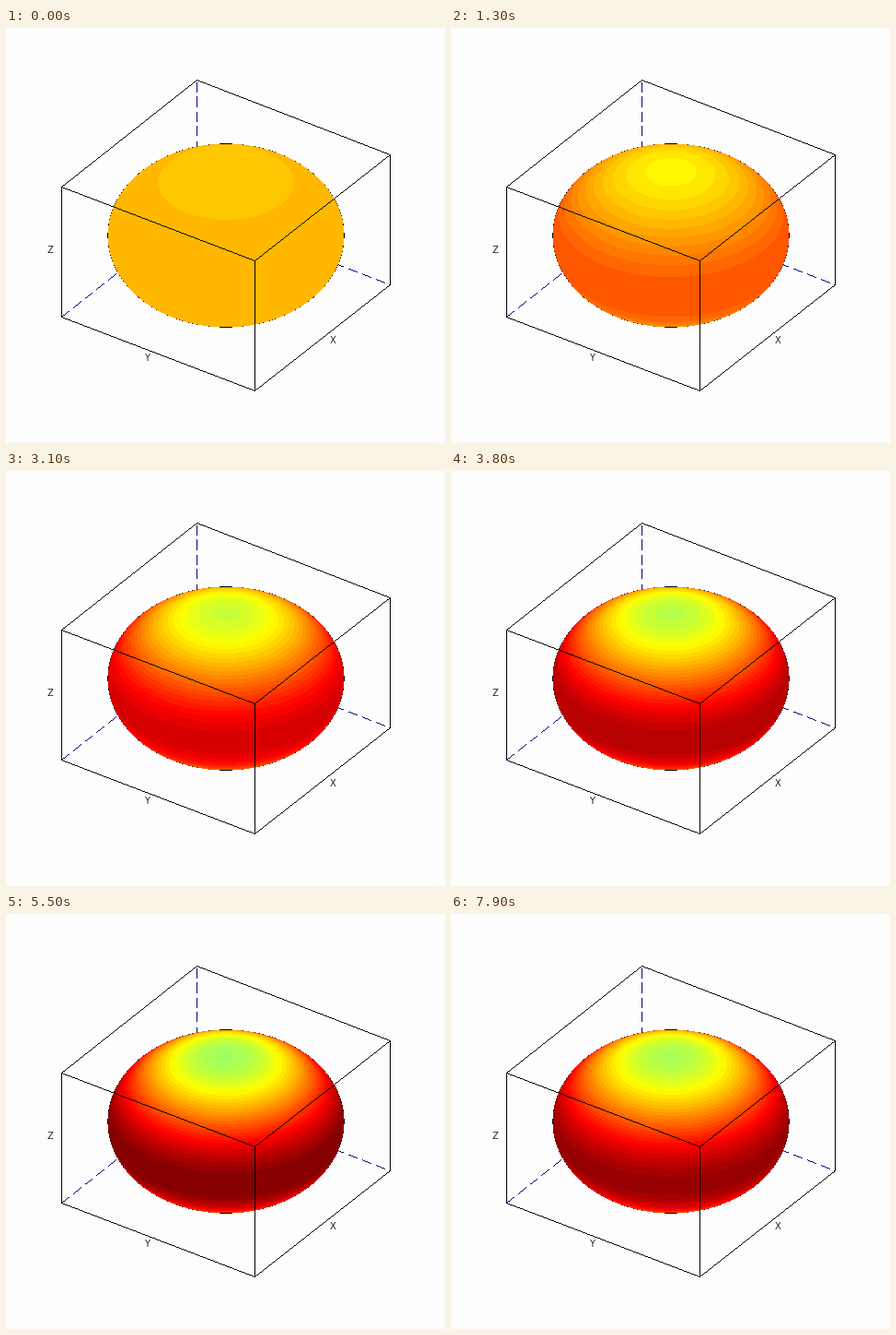
Animation of 477x450 px, one loop 8 s. Source, as a matplotlib script:

```python
import numpy as np
import matplotlib.pyplot as plt
from matplotlib.animation import FuncAnimation

WIDTH, HEIGHT, DPI = 477, 450, 72      # at 72 dpi one point is one pixel
FRAMES, INTERVAL = 80, 100
LEVELS, NEUTRAL = 64, 44               # palette size, level of zero potential
AMPLITUDE, RATE = 0.478, 0.025

CENTER_X, CENTER_Y = 238.5, 224.5
RADIUS_X, POLE, DEPTH = 128.35, 70.5, 70.2
RADIUS_Y = np.hypot(POLE, DEPTH)
RIM = 0.003                            # thin edge that shows as sparse dots

PAPER, BLACK, NAVY = (0.996,) * 3, (0, 0, 0), (0, 0, 0.5)
DASH, PERIOD = 11, 16


def jet(levels):
    u = (np.arange(levels) + 0.5) / levels
    return np.stack([np.clip(1.5 - abs(4 * u - c), 0, 1) for c in (3, 2, 1)], axis=1)


def spheroid():
    """Squared distance from the spin axis per pixel, and the outline equation."""
    y, x = np.mgrid[0:HEIGHT, 0:WIDTH]
    dx = (x - CENTER_X) / RADIUS_X
    dy = (y - CENTER_Y) / RADIUS_Y
    half = np.sqrt(np.clip(1 - dx**2, 1e-9, 1))
    angle = np.arccos(np.clip(dy / half, -1, 1)) - np.arctan2(POLE, DEPTH)
    return 1 - (half * np.sin(angle))**2, dx**2 + dy**2


def draw_line(canvas, start, end, color, dashed=False):
    """One-pixel line without smoothing."""
    start, end = np.array(start), np.array(end)
    t = np.linspace(0, 1, abs(end - start).max() + 1)
    if dashed:
        t = t[t * np.hypot(*(end - start)) % PERIOD < DASH]
    x, y = np.rint(start[:, None] + np.outer(end - start, t)).astype(int)
    canvas[y, x] = color


def draw_path(canvas, *points):
    for start, end in zip(points, points[1:]):
        draw_line(canvas, start, end, BLACK)


PALETTE = jet(LEVELS)
AXIS_DIST2, OUTLINE = spheroid()
INSIDE = OUTLINE <= 1

back, right, front, left = (207, 56), (417, 137), (270, 252), (60, 172)
low_back, low_right, low_front, low_left = (
    (x, y + 141) for x, y in (back, right, front, left))

BACKDROP = np.full((HEIGHT, WIDTH, 3), PAPER[0])
for corner in (back, low_left, low_right):
    draw_line(BACKDROP, low_back, corner, NAVY, dashed=True)
BACKDROP[OUTLINE <= 1 + RIM] = BLACK


def scene(frame):
    amplitude = AMPLITUDE * np.sin(RATE * (frame + 1))
    potential = amplitude * (AXIS_DIST2[INSIDE] - 1 / 3)
    level = np.clip(NEUTRAL + np.floor(potential * LEVELS), 0, LEVELS - 1).astype(int)
    canvas = BACKDROP.copy()
    canvas[INSIDE] = PALETTE[level]
    draw_path(canvas, back, right, front, left, back)
    draw_path(canvas, left, low_left, low_front, low_right, right)
    draw_path(canvas, front, low_front)
    return canvas


fig = plt.figure(figsize=(WIDTH / DPI, HEIGHT / DPI), dpi=DPI, facecolor=PAPER)
ax = fig.add_axes([0, 0, 1, 1])
ax.axis("off")
image = ax.imshow(scene(0), interpolation="nearest", aspect="auto")

for label, x, y in (("Z", 47, 243.5), ("Y", 152.6, 360.5), ("X", 354.6, 341.5)):
    ax.text(x, y, label, family="DejaVu Sans", size=10, color="#222222",
            ha="center", va="baseline")


def update(frame):
    image.set_data(scene(frame))
    return [image]


animation = FuncAnimation(fig, update, frames=FRAMES, interval=INTERVAL,
                          repeat=True, repeat_delay=0, blit=False)
plt.show()
```
